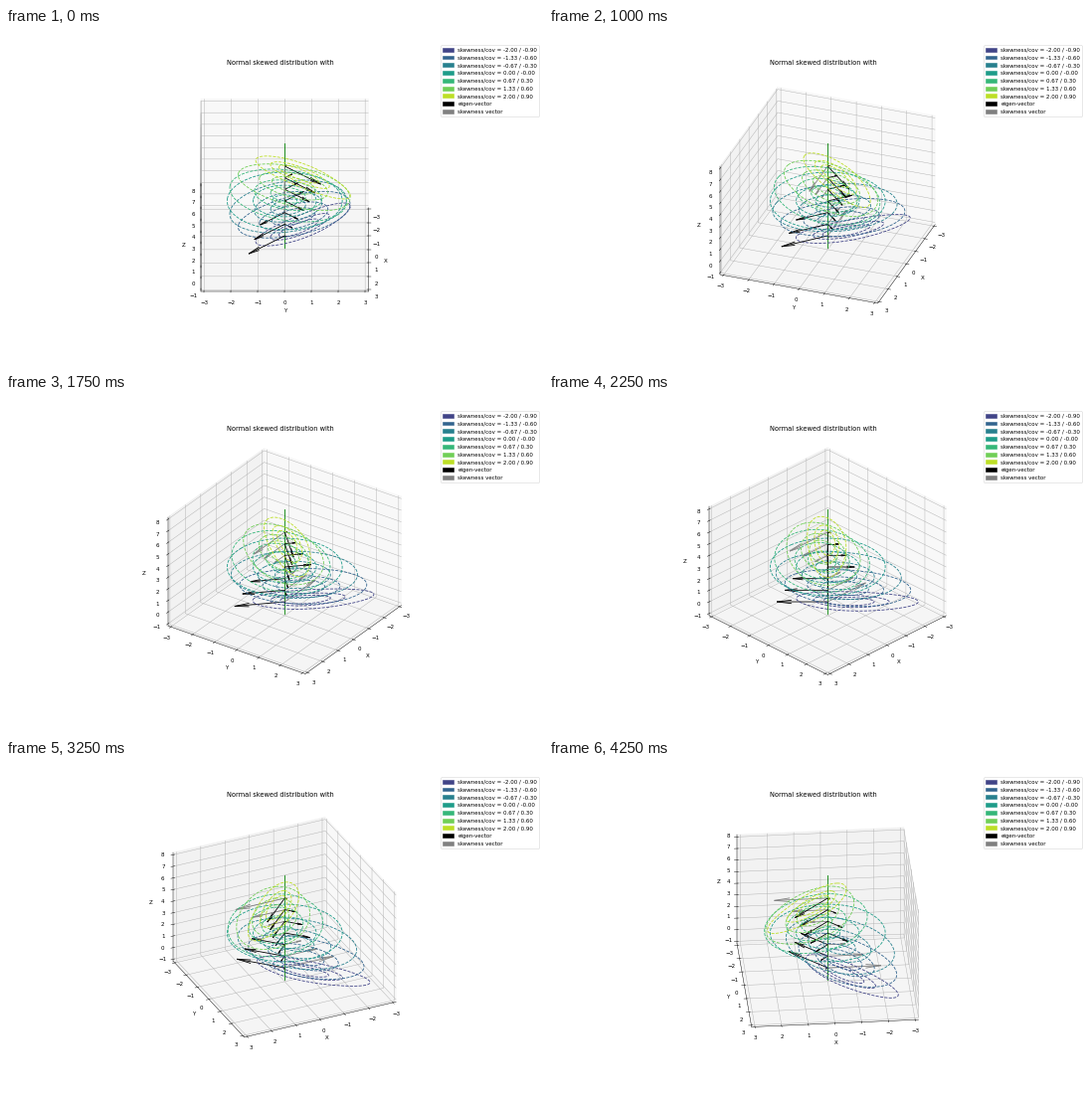
Animation, 540 px wide and 340 px high, one loop 4500 ms. Source, as a matplotlib script:

```python
import math

import matplotlib.pyplot as plt
import numpy as np
from matplotlib.animation import FuncAnimation
from matplotlib.patches import Patch

FRAMES, INTERVAL = 18, 250
DEGREES_PER_FRAME = 5
COUNT = 7
LEVELS = [0.1, 0.5, 0.9]

plt.rcParams["font.family"] = "DejaVu Sans"
fig = plt.figure(figsize=(13.5, 8.5), dpi=40)
ax = fig.add_subplot(projection="3d", proj_type="ortho")

axis_points = np.linspace(-3, 3, 201)
X, Y = np.meshgrid(axis_points, axis_points)


def normal_cdf(values):
    return np.array([0.5 * (1 + math.erf(v / math.sqrt(2))) for v in values])


def skewed_density(skew, cov):
    """Unnormalised bivariate skew-normal with unit variances."""
    quad = (X**2 - 2 * cov * X * Y + Y**2) / (1 - cov**2)
    return 2 * np.exp(-quad / 2) * normal_cdf(skew * axis_points)


def arrow(z, dx, dy, color):
    ax.quiver(0, 0, z, dx, dy, 0, color=color)


def set_limits(setter, low, high):
    margin = (high - low) / 48
    setter(low - margin, high + margin)


handles = []
for level in range(COUNT):
    skew = (level - 3) * 2 / 3
    cov = -0.9 + 0.3 * level
    color = plt.cm.viridis(0.2 + 0.7 * level / (COUNT - 1))

    ax.contour(X, Y, skewed_density(skew, cov), LEVELS, offset=level,
               colors=[color], linestyles="dashed")

    major = (1 + cov) / math.sqrt(2)
    minor = (1 - cov) / math.sqrt(2) * (-1 if cov < -0.01 else 1)
    arrow(level, major, major, "black")
    arrow(level, -minor, minor, "black")
    if skew:
        arrow(level, skew, 0, "gray")

    handles.append(Patch(color=color,
                         label=f"skewness/cov = {skew:.2f} / {cov:.2f}"))

handles.append(Patch(color="black", label="eigen-vector"))
handles.append(Patch(color="gray", label="skewness vector"))

ax.plot([0, 0], [0, 0], [-1, 8], color="green")

set_limits(ax.set_xlim, -3, 3)
set_limits(ax.set_ylim, -3, 3)
set_limits(ax.set_zlim, -1, 8)
ax.set_xticks(range(-3, 4))
ax.set_yticks(range(-3, 4))
ax.set_zticks(range(-1, 9))
ax.set_xlabel("X")
ax.set_ylabel("Y")
ax.set_zlabel("Z")
ax.set_title("Normal skewed distribution with", x=0.495)
ax.legend(handles=handles, loc="upper left", bbox_to_anchor=(1.1, 1.1))


def update(frame):
    # The tiny offset keeps the axes on the same edges when seen head-on.
    ax.view_init(elev=30, azim=DEGREES_PER_FRAME * frame + 0.001)
    return []


anim = FuncAnimation(fig, update, frames=FRAMES, interval=INTERVAL,
                     init_func=lambda: update(0), repeat=True, repeat_delay=0)
plt.show()
```
